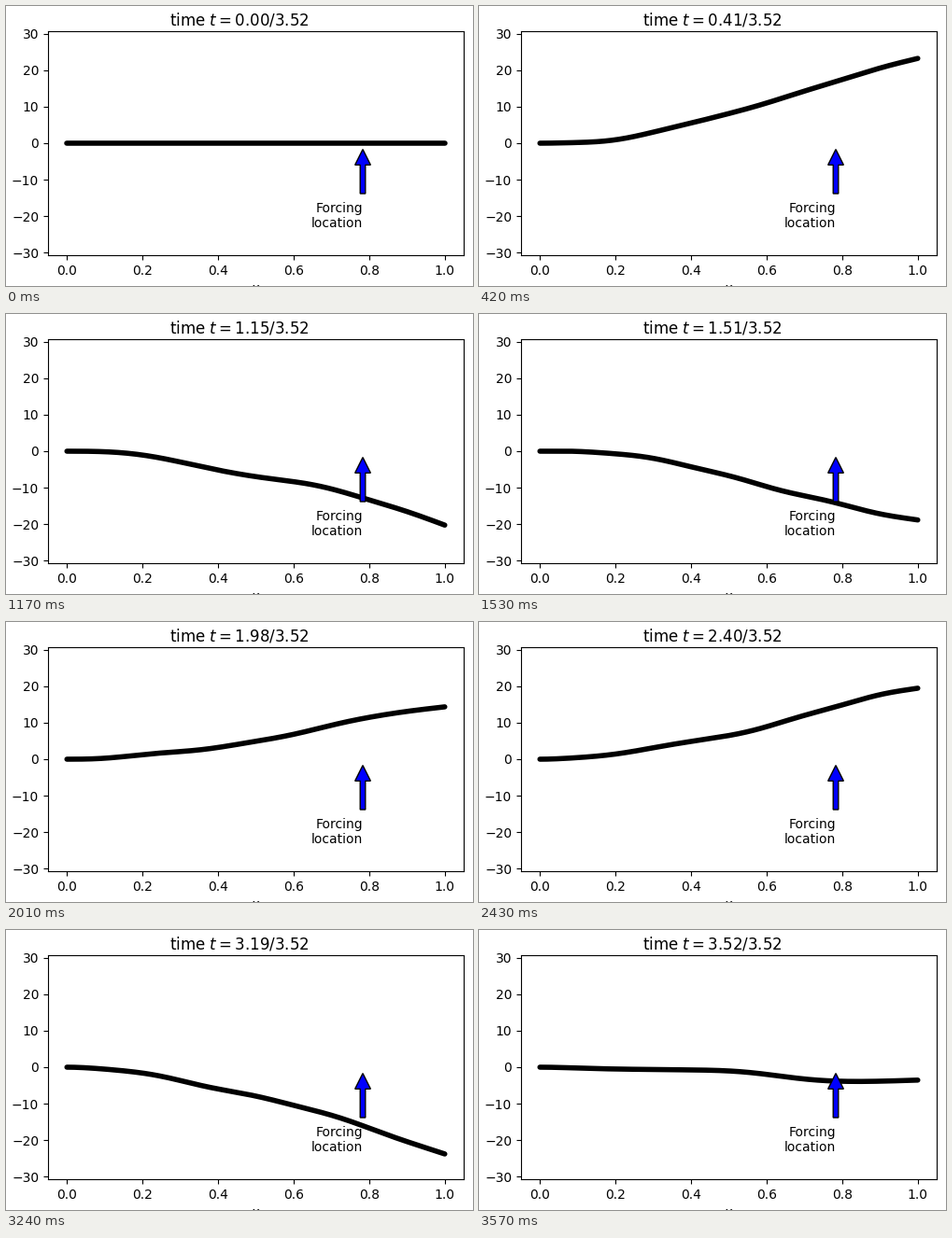
These frames come from a looping animation (500 px wide and 300 px high, 3600 ms). A matplotlib script:

```python
import numpy as np
import matplotlib.pyplot as plt
from matplotlib.animation import FuncAnimation
from matplotlib.patches import Polygon

FRAMES, INTERVAL = 120, 30
T_END = 3.52
IMPULSE = 30
FORCE_X = 0.7834  # node of the second mode

# Roots of cos(b) cosh(b) = -1 for a clamped-free beam
BETAS = np.array([1.8751041, 4.6940911, 7.8547574, 10.9955407]
                 + [(n - 0.5) * np.pi for n in range(5, 11)])


def mode(beta, x):
    """Clamped-free mode shape, written to stay stable for large beta."""
    sigma = (np.cosh(beta) + np.cos(beta)) / (np.sinh(beta) + np.sin(beta))
    # (1 - sigma) / 2 without cancellation
    grow = (np.sin(beta) - np.cos(beta) - np.exp(-beta)) / (
        2 * (np.sinh(beta) + np.sin(beta)))
    bx = beta * x
    return (grow * np.exp(bx) + (1 + sigma) / 2 * np.exp(-bx)
            - np.cos(bx) + sigma * np.sin(bx))


x = np.linspace(0, 1, 201)
omegas = BETAS ** 2
shapes = np.array([IMPULSE * mode(b, FORCE_X) * mode(b, x) / b ** 2
                   for b in BETAS])


def deflection(t):
    return np.sin(omegas * t) @ shapes


fig = plt.figure(figsize=(5, 3), dpi=100)
ax = fig.add_axes([0.09, 0.11, 0.89, 0.80])
ax.set_xlim(-0.05, 1.05)
ax.set_ylim(-30.7, 30.7)
ax.set_xlabel("$x$")
title = fig.suptitle("")
beam, = ax.plot(x, 0 * x, color="black", lw=4, solid_capstyle="round")


def add_arrow(cx, tip, tail, shaft=5.56, head=16.67):
    """Upward block arrow, in pixels from the top left corner."""
    neck = tip + head
    side = [(head / 2, neck), (shaft / 2, neck), (shaft / 2, tail)]
    pts = [(0, tip)] + side + [(-dx, y) for dx, y in side[::-1]]
    ax.add_patch(Polygon([(cx + dx, 300 - y) for dx, y in pts],
                         transform=None, fc="blue", ec="black", lw=1,
                         joinstyle="miter", zorder=3))


add_arrow(382, 153.6, 201)
ax.text(FORCE_X, -20, "Forcing\nlocation", ha="right", va="center")


def draw(i):
    t = T_END * i / (FRAMES - 1)
    beam.set_ydata(deflection(t))
    title.set_text(f"time $t={t:.2f}/{T_END:.2f}$")
    return beam, title


anim = FuncAnimation(fig, draw, frames=FRAMES, interval=INTERVAL,
                     repeat=True, repeat_delay=0)
plt.show()
```
